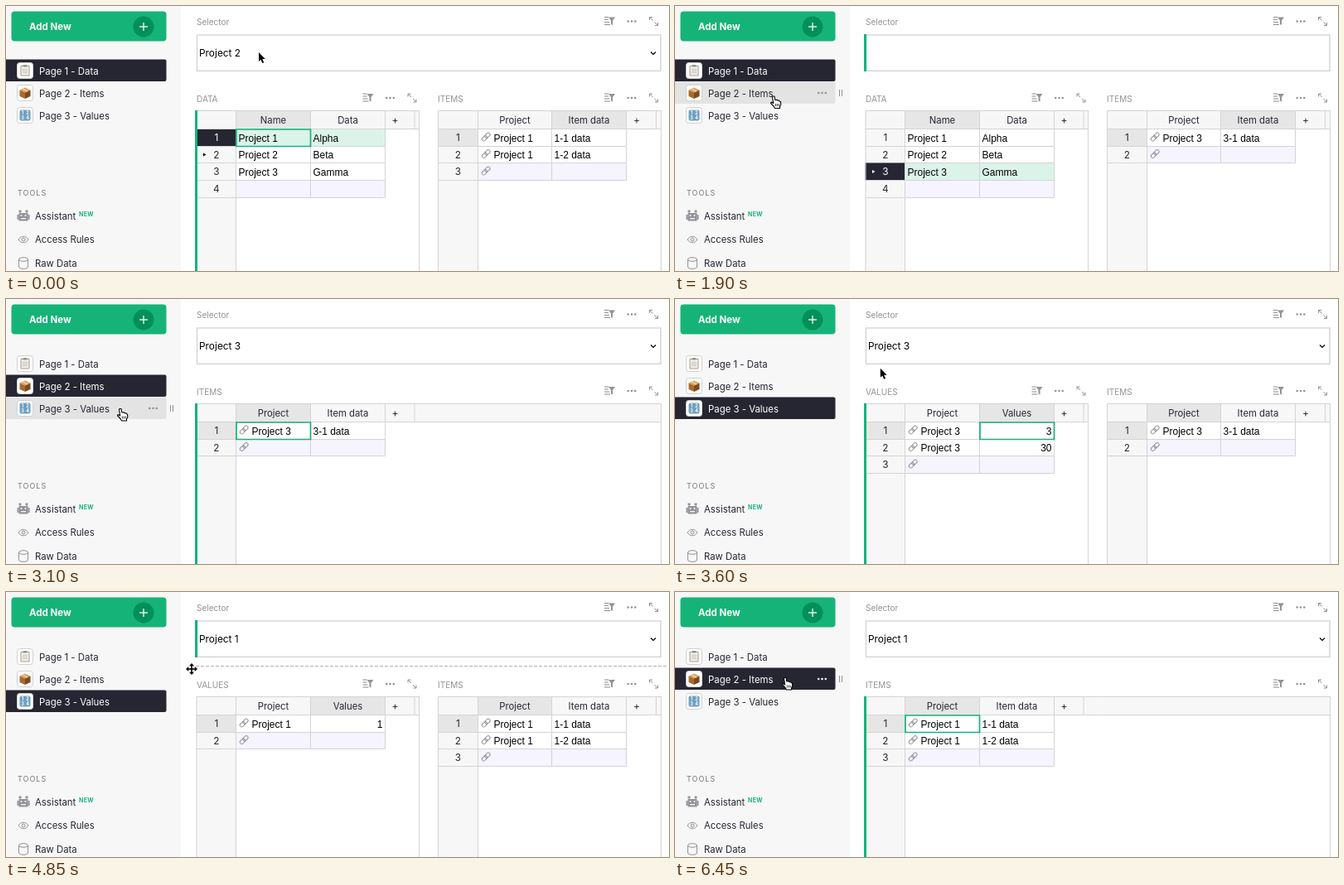
Write an HTML page with a canvas that moves like this. It is 800 px wide and 320 px high and loops after 6.78 s.

```html
<!DOCTYPE html>
<html lang="en">
<head>
<meta charset="utf-8">
<title>Linked project pages</title>
<style>
html, body { margin: 0; width: 100%; height: 100%; overflow: hidden; background: #fff; }
canvas { display: block; width: 800px; height: 320px; }
</style>
</head>
<body>
<canvas id="stage"></canvas>
<script>
const LOOP = 6780, STEP = 50;
const canvas = document.getElementById('stage');
const ctx = canvas.getContext('2d');
const ratio = window.devicePixelRatio || 1;
canvas.width = 800 * ratio;
canvas.height = 320 * ratio;

const GREEN = '#16b378', DARK = '#262633', GREY = '#929299', PANEL = '#f7f7f7';
const LINE = '#d4d4d4', HEAD_ON = '#e6e6e6', NEW_ROW = '#f5f4ff', ROW_ON = '#dbf4ea';
const UI = 'Inter, sans-serif', CELL = '"Liberation Sans", Arial, sans-serif';

// State changes: [time, changed values]
const events = [
  [0, { page: 1, sel: 2, active: 'grid', row: 1, arrow: 2, items: 1, pop: 0, hover: 0, blank: false, ghost: false }],
  [350, { active: 'sel' }],
  [400, { pop: 2, hover: 2 }],
  [550, { hover: 3 }],
  [900, { pop: 0, sel: 3, row: 3, arrow: 3, ghost: true }],
  [950, { items: 3, ghost: false }],
  [1900, { blank: true }],
  [2000, { page: 2, active: 'grid', blank: false }],
  [3150, { blank: true }],
  [3250, { page: 3, blank: false }],
  [3700, { active: 'sel' }],
  [3750, { pop: 3, hover: 3 }],
  [4000, { hover: 2 }],
  [4200, { hover: 1 }],
  [4350, { pop: 0, sel: 1 }],
  [4400, { items: 1, row: 1, arrow: 1 }],
  [5400, { blank: true }],
  [5450, { page: 1, blank: false }],
  [6400, { blank: true }],
  [6450, { page: 2, active: 'grid', blank: false }]
];

// Pointer path: [time, x, y]
const path = [
  [350, 305, 56], [650, 305, 62], [1500, 305, 62], [1900, 119, 109], [2000, 119, 109],
  [2150, 153, 105], [2520, 285, 70], [2850, 205, 105], [3100, 138, 132.5], [3250, 138, 132.5],
  [3550, 240, 90], [3750, 290, 50], [4100, 287, 29], [4250, 285, 10], [4350, 285, 8],
  [4850, 224, 93], [4950, 180, 98], [5250, 133, 76], [5750, 133, 76], [5950, 133, 103.5]
];

const itemData = {
  1: [['Project 1', '1-1 data'], ['Project 1', '1-2 data']],
  3: [['Project 3', '3-1 data']]
};
const valueData = {
  1: [['Project 1', '1']],
  3: [['Project 3', '3'], ['Project 3', '30']]
};
const projects = [['Project 1', 'Alpha'], ['Project 2', 'Beta'], ['Project 3', 'Gamma']];
const pages = ['Page 1 - Data', 'Page 2 - Items', 'Page 3 - Values'];

function stateAt(t) {
  return Object.assign({}, ...events.filter(e => e[0] <= t).map(e => e[1]));
}

function pointerAt(t) {
  const i = path.findIndex(p => p[0] > t);
  if (i === 0) return path[0].slice(1);
  if (i < 0) return path[path.length - 1].slice(1);
  const [t0, x0, y0] = path[i - 1], [t1, x1, y1] = path[i];
  const u = (t - t0) / (t1 - t0), k = u * u * (3 - 2 * u);
  return [x0 + (x1 - x0) * k, y0 + (y1 - y0) * k];
}

function box(x, y, w, h, fill, r = 0, stroke, lw = 1) {
  ctx.beginPath();
  ctx.roundRect(x, y, w, h, r);
  if (fill) { ctx.fillStyle = fill; ctx.fill(); }
  if (stroke) { ctx.strokeStyle = stroke; ctx.lineWidth = lw; ctx.stroke(); }
}

function poly(points, stroke, lw = 1, fill) {
  ctx.beginPath();
  for (let i = 0; i < points.length; i += 2) ctx.lineTo(points[i], points[i + 1]);
  if (fill) { ctx.closePath(); ctx.fillStyle = fill; ctx.fill(); }
  if (stroke) { ctx.strokeStyle = stroke; ctx.lineWidth = lw; ctx.stroke(); }
}

function disc(x, y, r, fill) {
  ctx.beginPath();
  ctx.arc(x, y, r, 0, 7);
  ctx.fillStyle = fill;
  ctx.fill();
}

function text(s, x, y, size, color = DARK, { font = UI, align = 'left', weight = 400, gap = 0 } = {}) {
  ctx.font = `${weight} ${size}px ${font}`;
  ctx.textAlign = align;
  ctx.letterSpacing = gap + 'px';
  ctx.fillStyle = color;
  ctx.fillText(s, x, y + size * 0.36);
}

function at(x, y, draw) {
  ctx.save();
  ctx.translate(x, y);
  draw();
  ctx.restore();
}

function dots(x, y, color) {
  for (const d of [-4.3, 0, 4.3]) disc(x + d, y, 1.3, color);
}

function pageIcon(n, y) {
  box(13.5, y - 9.5, 19, 19, '#fff', 3, '#d0d0d0');
  at(23, y, () => {
    if (n === 1) {
      box(-5.5, -6, 11, 12.5, '#a89a86', 1);
      box(-4.5, -5, 9, 10.5, '#f0efe8');
      box(-2.5, -7, 5, 2.5, '#8d9298', 1);
      for (const d of [-2, 0, 2]) poly([-3, d + .5, 3, d + .5], '#b9b9b4', .8);
    } else if (n === 2) {
      poly([-6.5, -3.5, 0, -6.5, 6.5, -3.5, 0, -.5], null, 1, '#d9a25b');
      poly([-6.5, -3.5, 0, -.5, 0, 7, -6.5, 4], null, 1, '#a9692d');
      poly([6.5, -3.5, 0, -.5, 0, 7, 6.5, 4], null, 1, '#7d4a20');
      poly([-3, -5, 3, -2], '#ecd0a0', 1.5);
    } else {
      box(-6.5, -6.5, 13, 13, '#6f9fc0', 2);
      [['1', -3, -3], ['2', 3, -3], ['3', -3, 3], ['4', 3, 3]].forEach(([s, x, yy]) =>
        text(s, x, yy, 5.5, '#fff', { align: 'center', weight: 700 }));
    }
  });
}

function toolIcons() {
  at(21, 253, () => {
    box(-5.5, -3, 11, 9.5, GREY);
    for (const side of [-1, 1]) {
      box(side * 6.5 - 1, -1, 2, 6, GREY);
      box(side * 4 - 1.5, -6.5, 3, 2.5, GREY);
      poly([side * 4, -5, side * 4, -2], GREY, 1);
      disc(side * 2.5, 0, 1.1, PANEL);
    }
    box(-3, 3, 6, 1.3, PANEL);
  });
  at(21, 282, () => {
    ctx.beginPath();
    ctx.moveTo(-6, 0);
    ctx.bezierCurveTo(-3, -5, 3, -5, 6, 0);
    ctx.bezierCurveTo(3, 5, -3, 5, -6, 0);
    ctx.strokeStyle = GREY;
    ctx.lineWidth = 1;
    ctx.stroke();
    ctx.beginPath();
    ctx.arc(0, 0, 2, 0, 7);
    ctx.stroke();
  });
  at(21, 310, () => {
    ctx.strokeStyle = GREY;
    ctx.lineWidth = 1;
    ctx.beginPath();
    ctx.ellipse(0, -4, 5.5, 2.3, 0, 0, 7);
    ctx.moveTo(-5.5, -4);
    ctx.lineTo(-5.5, 5);
    ctx.ellipse(0, 5, 5.5, 2.3, 0, Math.PI, 0, true);
    ctx.lineTo(5.5, -4);
    ctx.stroke();
  });
}

function sidebar(page, hover) {
  box(0, 0, 211, 320, PANEL);
  box(6.5, 6.5, 187, 36, GREEN, 4);
  text('Add New', 28, 25, 11.5, '#fff', { weight: 700 });
  disc(166, 25, 12.5, '#009058');
  poly([161, 25, 171, 25], '#fff', 1.3);
  poly([166, 20, 166, 30], '#fff', 1.3);
  pages.forEach((name, i) => {
    const y = 78 + 27 * i, on = page === i + 1, over = hover === i + 1;
    if (on || over) box(0, y - 13.5, 193.5, 26.5, on ? DARK : '#e3e3e3', [0, 2, 2, 0]);
    pageIcon(i + 1, y);
    text(name, 40, y + .5, 11.4, on ? '#fff' : DARK);
    if (over) {
      dots(177.5, y, on ? '#fff' : GREY);
      poly([198.5, y - 4, 198.5, y + 4], GREY);
      poly([201.5, y - 4, 201.5, y + 4], GREY);
    }
  });
  text('TOOLS', 14, 226, 9, '#77777f', { gap: 1 });
  toolIcons();
  text('Assistant', 35, 253.5, 11.4);
  text('NEW', 88, 251, 7, GREEN, { weight: 700, gap: .3 });
  text('Access Rules', 35, 282.3, 11.3);
  text('Raw Data', 35, 311, 11.3);
}

// Title and menu icons above a section
function sectionHead(title, x, right, y) {
  text(title, x, y + 1, 10, GREY);
  at(right - 62, y - .5, () => {
    for (const [d, w] of [[-4.5, 5], [-1.5, 5], [1.5, 6], [4.5, 7]]) {
      poly([-6, d, w - 6, d], GREY, 1.1);
    }
    poly([-1, -4.5, 7, -4.5, 4, -.5, 4, 5, 2, 4, 2, -.5], null, 1, GREY);
  });
  dots(right - 35, y, GREY);
  at(right - 8.5, y, () => {
    poly([-5, -1.5, -5, -5, -1.5, -5], GREY);
    poly([-5, -5, -1, -1], GREY);
    poly([5, 1.5, 5, 5, 1.5, 5], GREY);
    poly([5, 5, 1, 1], GREY);
  });
}

function linkIcon(x, y) {
  at(x, y, () => {
    ctx.rotate(-Math.PI / 4);
    box(-6, -2.2, 7, 4.4, null, 2.2, GREY);
    box(-1, -2.2, 7, 4.4, null, 2.2, GREY);
  });
}

// opt: headOn, row, arrow, linked, focus, active
function grid(x, right, cols, rows, opt) {
  const top = 126.5, first = 148.5, pitch = 20.7;
  const edges = [x + 48, x + 137.5, x + 227.5].map(v => Math.floor(v) + .5);
  box(x, top, right - x, first - top, PANEL);
  box(x, first, 48, 172, PANEL);
  cols.forEach((c, i) => {
    if (opt.headOn === i) box(edges[i], top, edges[i + 1] - edges[i], first - top, HEAD_ON);
    text(c.name, (edges[i] + edges[i + 1]) / 2, 138, 11.3, DARK, { align: 'center' });
  });
  text('+', x + 240, 138, 12, DARK, { align: 'center' });

  for (let r = 0; r <= rows.length; r++) {
    const y = first + Math.round(r * pitch), h = Math.round((r + 1) * pitch) - Math.round(r * pitch);
    const mid = y + h / 2, on = opt.row === r + 1, dark = on && opt.linked;
    if (on) box(x, y, 48, h, dark ? DARK : HEAD_ON);
    text(String(r + 1), x + 24.3, mid, 11.8, dark ? '#fff' : DARK, { align: 'center' });
    if (opt.arrow === r + 1) {
      poly([x + 8.5, mid - 2, x + 12, mid, x + 8.5, mid + 2], null, 1, dark ? '#fff' : '#000');
    }
    cols.forEach((c, i) => {
      const cx = edges[i], w = edges[i + 1] - cx;
      const fill = r === rows.length ? NEW_ROW : dark ? ROW_ON : '#fff';
      box(cx, y, w, h, fill, 0, LINE);
      if (c.ref) linkIcon(cx + 9.7, mid - 1);
      if (r === rows.length) return;
      const tx = c.num ? edges[i + 1] - 3 : cx + (c.ref ? 19 : 3);
      text(rows[r][i], tx, mid + .5, 12, '#000', { font: CELL, align: c.num ? 'right' : 'left' });
    });
    poly([x, y + h, edges[0], y + h], LINE);
  }

  poly([x, first, right, first], LINE);
  poly([x + .5, 320, x + .5, top, right, top], LINE);
  poly([edges[0], top, edges[0], 320], LINE);
  for (const e of [edges[1], edges[2], x + 263.5]) poly([e, top, e, first], LINE);
  poly([right - .5, top, right - .5, 320], LINE);
  if (opt.active) {
    box(228, 126, 3, 194, GREEN);
    const c = opt.focus;
    box(edges[c] + .5, first + .5, edges[c + 1] - edges[c] - .5, 20.5, null, 0, GREEN, 1.7);
  }
}

function selector(s) {
  sectionHead('Selector', 230, 790, 18.5);
  box(230.5, 35, 559.5, 43.3, '#fff', 0, '#d9d9d9', 1.7);
  if (s.active === 'sel') box(228, 34, 3, 45, GREEN);
  if (s.blank) return;
  text('Project ' + s.sel, 233, 57, 11.9, '#000');
  poly([778, 55.5, 781, 58.5, 784, 55.5], '#000', 1.2);
}

function popup(s) {
  const rowY = i => 44.3 + 20 * (i - s.pop);
  ctx.save();
  ctx.shadowColor = 'rgba(0,0,0,.35)';
  ctx.shadowBlur = 8 * ratio;
  ctx.shadowOffsetY = 2 * ratio;
  box(223, rowY(1) - 14, 567, 68, '#e6e8e3', 6);
  ctx.restore();
  for (let i = 1; i <= 3; i++) {
    const y = rowY(i), color = s.hover === i ? '#fff' : '#222';
    if (s.hover === i) box(229, y - 10, 556, 20, '#3480e7', 4);
    if (s.pop === i) poly([240.5, y, 243.5, y + 3.5, 248.5, y - 4], color, 1.8);
    text('Project ' + i, 253, y, 11.7, color);
  }
}

function sections(s) {
  const inGrid = s.active === 'grid', left = 229.5;
  const itemCols = [{ name: 'Project', ref: true }, { name: 'Item data' }];
  const items = itemData[s.items];
  if (s.page === 2) {
    sectionHead('ITEMS', 230, 790, 111);
    grid(left, 791, itemCols, items, { headOn: 0, row: 1, focus: 0, active: inGrid });
    return;
  }
  sectionHead(s.page === 1 ? 'DATA' : 'VALUES', 230, 498.5, 111);
  if (s.page === 1) {
    grid(left, 499, [{ name: 'Name' }, { name: 'Data' }], projects,
      { headOn: 0, row: s.row, arrow: s.arrow, linked: true, focus: 0, active: inGrid });
  } else {
    grid(left, 499, [{ name: 'Project', ref: true }, { name: 'Values', num: true }], valueData[s.items],
      { headOn: 1, row: 1, focus: 1, active: inGrid });
  }
  sectionHead('ITEMS', 521, 790, 111);
  grid(521, 791, itemCols, items, { headOn: s.page === 1 ? 1 : 0, row: 1 });
}

function arrowCursor() {
  const shape = [0, 0, 0, 11, 2.5, 8.7, 4.3, 13, 6.2, 12.2, 4.4, 8, 7.8, 8, 0, 0];
  poly(shape, '#fff', 1.4);
  poly(shape, null, 1, '#000');
}

function handCursor() {
  ctx.lineJoin = 'round';
  poly([-1, 0, 1, 0, 1.8, 4.5, 4, 4.2, 5, 5.2, 6.5, 5, 7.3, 6.2, 8.5, 6.5, 8.8, 10, 7.5, 12.5,
    7.5, 14.5, 1.5, 14.5, 0, 12, -3.5, 8.3, -2.8, 7, -.3, 8.5, -1.5, 1, -1, 0], '#000', 1.1, '#fff');
  for (const x of [2.3, 4.3, 6.3]) poly([x, 9, x, 12], '#000', .8);
}

function moveCursor() {
  for (const [color, lw] of [['#fff', 4], ['#000', 1.6]]) {
    poly([-5, 0, 5, 0], color, lw);
    poly([0, -5, 0, 5], color, lw);
  }
  for (let i = 0; i < 4; i++) {
    ctx.rotate(Math.PI / 2);
    poly([7, 0, 3.8, -3, 3.8, 3], null, 1, '#000');
  }
}

function draw(t) {
  const s = stateAt(t), [x, y] = pointerAt(t);
  const row = Math.floor((y - 65) / 27) + 1;
  const hover = x < 194 && row >= 1 && row <= 3 ? row : 0;
  const resizing = t >= 4850 && t < 4900;
  ctx.setTransform(ratio, 0, 0, ratio, 0, 0);
  box(0, 0, 800, 320, '#fff');
  sidebar(s.page, hover);
  selector(s);
  sections(s);
  if (s.ghost) box(223, 5.5, 575, 84, null, 16, '#f0f0f0');
  if (s.pop) popup(s);
  if (resizing) {
    ctx.setLineDash([4, 2]);
    poly([223, 89.5, 799, 89.5], '#b0b0b0');
    ctx.setLineDash([]);
  }
  at(x, y, resizing ? moveCursor : hover ? handCursor : arrowCursor);
}

const start = performance.now();
function frame() {
  const t = (performance.now() - start) % LOOP;
  draw(Math.floor(t / STEP) * STEP);
  requestAnimationFrame(frame);
}
frame();
</script>
</body>
</html>
```
